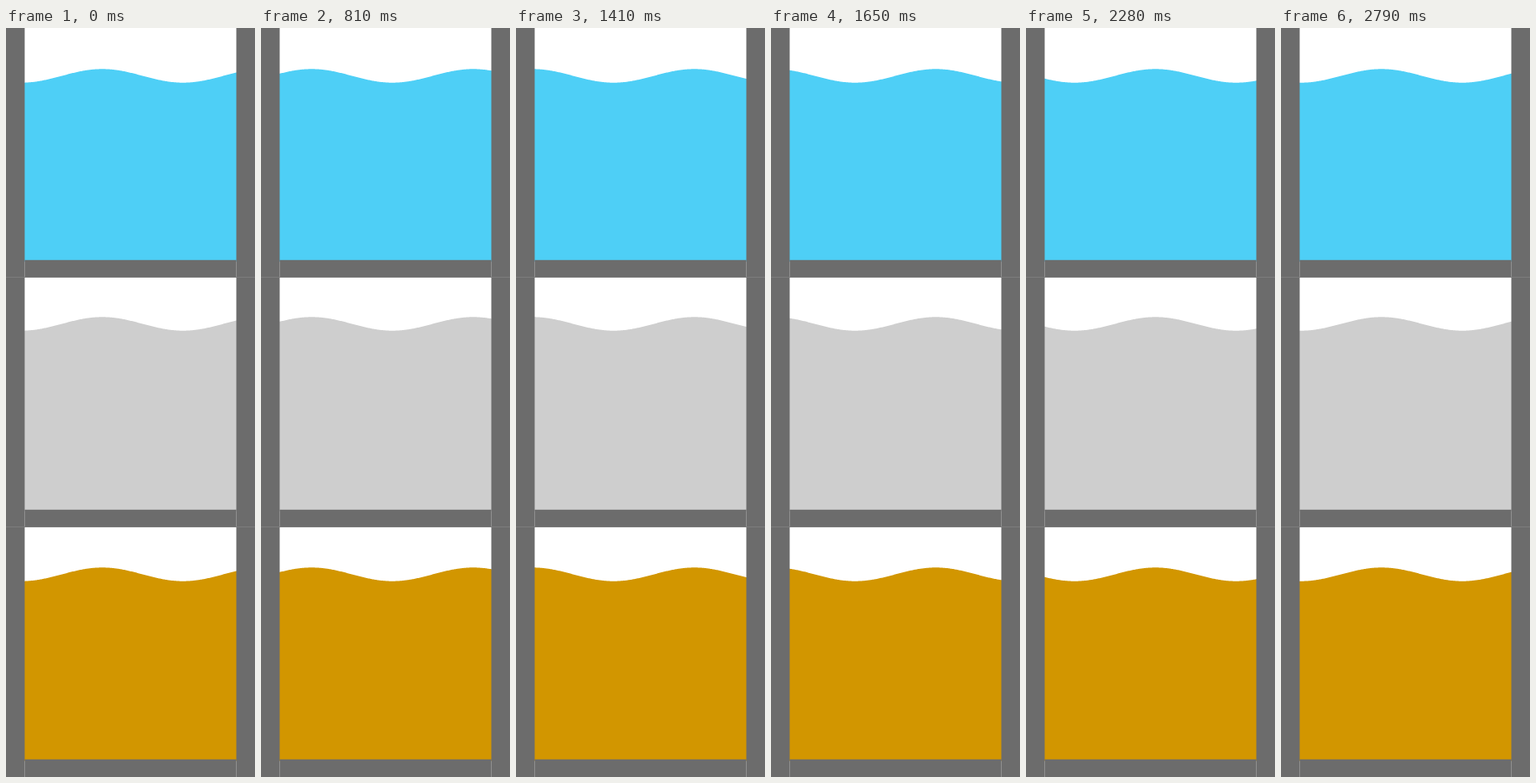
These frames come from a looping animation (300x900 px, 2820 ms). An HTML page with a canvas:

```html
<!DOCTYPE html>
<html>
<head>
<meta charset="utf-8">
<style>
html, body { margin: 0; width: 100%; height: 100%; overflow: hidden; background: #fff; }
canvas { display: block; }
</style>
</head>
<body>
<canvas id="stage" width="300" height="900"></canvas>
<script>
const ctx = document.getElementById('stage').getContext('2d');
const LOOP = 2820, STEP = 30;
const LEFT = 22.5, RIGHT = 277.5, FLOOR = 278.8;
const WAVELENGTH = 194.6, AMPLITUDE = 8.2, SPEED = 0.0679;
const tanks = [
  { color: '#4ecff6', level: 57.5 },
  { color: '#cecece', level: 55.5 },
  { color: '#d29600', level: 56.5 }
];

function rect(color, x, y, w, h) {
  ctx.fillStyle = color;
  ctx.fillRect(x, y, w, h);
}

function drawTank({ color, level }, top, crest) {
  ctx.save();
  ctx.translate(0, top);
  rect('#fff', 0, 0, 300, 300);

  ctx.beginPath();
  ctx.moveTo(LEFT - 2, FLOOR + 2);
  for (let x = LEFT - 2; x <= RIGHT + 2; x++) {
    ctx.lineTo(x, level - AMPLITUDE * Math.cos((x - crest) * 2 * Math.PI / WAVELENGTH));
  }
  ctx.lineTo(RIGHT + 2, FLOOR + 2);
  ctx.fillStyle = color;
  ctx.fill();

  const wall = '#6c6c6c';
  rect(wall, 0, 0, LEFT, 300);
  rect(wall, RIGHT, 0, 300 - RIGHT, 300);
  rect(wall, LEFT, FLOOR, RIGHT - LEFT, 300 - FLOOR);
  if (top < 600) rect('#7c7c7c', 0, 299, 300, 1);
  ctx.restore();
}

function draw(now) {
  const time = Math.floor(now % LOOP / STEP) * STEP;
  const crest = 116 - SPEED * time;
  tanks.forEach((tank, i) => drawTank(tank, i * 300, crest));
  requestAnimationFrame(draw);
}
draw(0);
</script>
</body>
</html>
```
